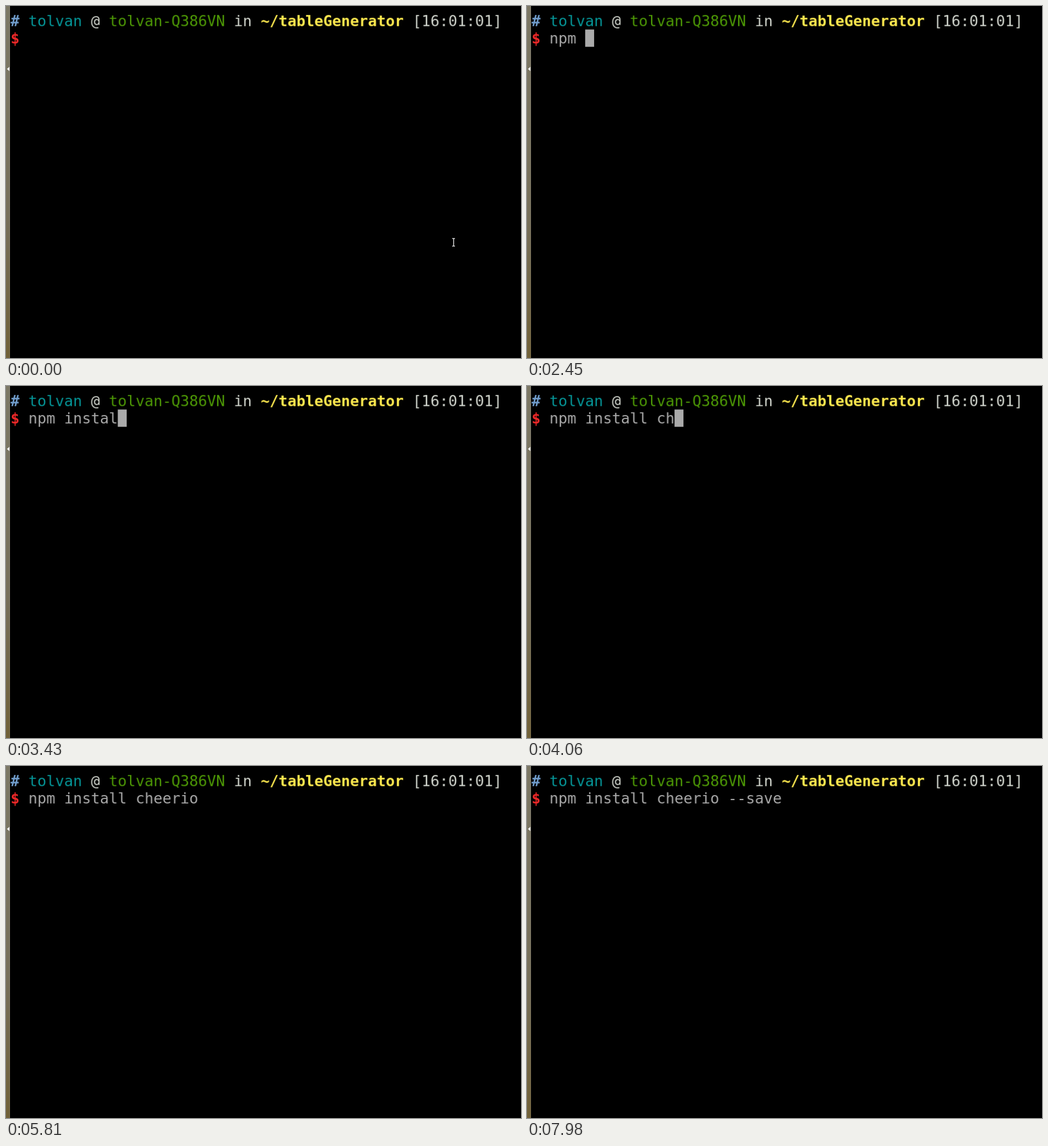
An HTML page with a canvas that plays this animation: 905x619 px, repeating every 8 s.

```html
<!DOCTYPE html>
<html lang="en">
<head>
<meta charset="utf-8">
<title>Terminal</title>
<style>
  html, body { margin: 0; width: 100%; height: 100%; overflow: hidden; background: #000; }
  canvas { display: block; }
</style>
</head>
<body>
<canvas id="stage" width="905" height="619"></canvas>
<script>
const ctx = document.getElementById('stage').getContext('2d');
const LOOP = 8000;

// The terminal is drawn on a whole-pixel grid, then scaled onto the stage
const CELL_W = 16, CELL_H = 31, ASCENT = 25;
const SCALE = 0.98125, LEFT = 8, TOP = 10.9;
const FONT = '26.667px "DejaVu Sans Mono", monospace';
const screen = document.createElement('canvas');
screen.width = 56 * CELL_W;
screen.height = 4 * CELL_H;
const term = screen.getContext('2d');

const GREY = '#aaaaaa', LIGHT = '#d3d7cf';
const PROMPT = [
  ['# ', '#729fcf', true],
  ['tolvan', '#06989a'],
  [' @ ', LIGHT],
  ['tolvan-Q386VN', '#4e9a06'],
  [' in ', LIGHT],
  ['~/tableGenerator', '#fce94f', true],
  [' [16:01:01]', LIGHT]
];

const COMMAND = 'npm install cheerio --save';
// One keystroke time per character of the command
const KEYS = [
  1260, 1470, 2170, 2450,
  2660, 2800, 2940, 3150, 3290, 3430, 3570, 3710,
  3920, 4060, 4550, 4690, 4830, 5040, 5180, 6020,
  6300, 6440, 6580, 6720, 7000, 7210
];
const ENTER = 7420;
const POINTER_HIDDEN = 1190;
const CURSOR_OFF = [[0, 70], [700, 1260], [2100, 2170], [5810, 6020], [7980, LOOP]];

// Draws text on the terminal grid and returns the next free column
function write(text, col, row, color, bold) {
  term.font = (bold ? 'bold ' : '') + FONT;
  term.fillStyle = color;
  for (const ch of text) term.fillText(ch, CELL_W * col++, CELL_H * row + ASCENT);
  return col;
}

function drawCursor(t, typed) {
  if (CURSOR_OFF.some(([from, to]) => t >= from && t < to)) return;
  const [col, row] = t >= ENTER ? [0, 2] : [2 + typed, 1];
  term.fillStyle = GREY;
  term.fillRect(col * CELL_W, row * CELL_H, CELL_W, CELL_H);
}

function drawTerminal(t) {
  term.clearRect(0, 0, screen.width, screen.height);
  let col = 0;
  for (const [text, color, bold] of PROMPT) col = write(text, col, 0, color, bold);

  const typed = KEYS.filter(k => t >= k).length;
  write('$', 0, 1, '#ef2929', true);
  write(COMMAND.slice(0, typed), 2, 1, GREY);
  drawCursor(t, typed);
  ctx.drawImage(screen, LEFT, TOP, screen.width * SCALE, screen.height * SCALE);
}

function drawEdge() {
  const shade = ctx.createLinearGradient(0, 0, 0, 619);
  shade.addColorStop(0, '#7c7865');
  shade.addColorStop(0.6, '#77705a');
  shade.addColorStop(1, '#716138');
  ctx.fillStyle = shade;
  ctx.fillRect(0, 0, 7, 619);
  ctx.fillStyle = 'rgba(255,255,255,0.12)';
  ctx.fillRect(6, 0, 1, 619);
  ctx.fillStyle = '#eeeeee';
  ctx.beginPath();
  ctx.moveTo(1.5, 110.8);
  ctx.lineTo(6, 107);
  ctx.lineTo(6, 114.6);
  ctx.fill();
}

function drawPointer() {
  ctx.fillStyle = '#e8e8e8';
  ctx.fillRect(785.9, 409, 1.4, 13);
  for (const y of [408.2, 421.6]) ctx.fillRect(784, y, 5, 1.3);
}

function draw(t) {
  ctx.fillStyle = '#000';
  ctx.fillRect(0, 0, 905, 619);
  drawEdge();
  drawTerminal(t);
  if (t < POINTER_HIDDEN) drawPointer();
}

const start = performance.now();
function tick() {
  draw((performance.now() - start) % LOOP);
  requestAnimationFrame(tick);
}
tick();
</script>
</body>
</html>
```
